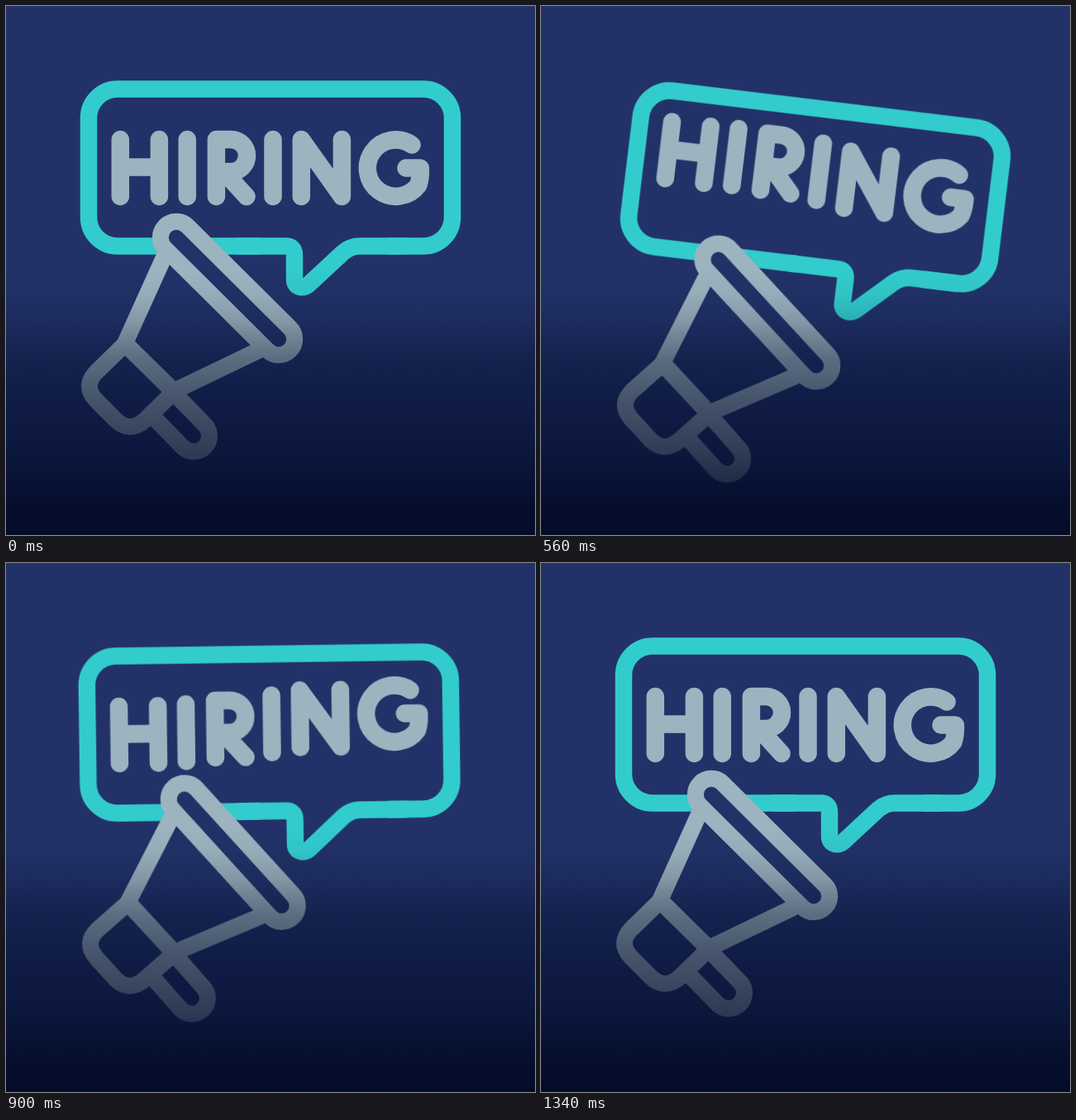
An HTML page for the animation above (1360 ms loop, 640 by 640 pixels).

```html
<!DOCTYPE html>
<html lang="en">
<head>
<meta charset="utf-8">
<title>Hiring</title>
<style>
  html, body { margin: 0; width: 100%; height: 100%; overflow: hidden; background: #223268; }
  svg { display: block; width: 100vw; height: 100vh; }

  .line { fill: none; stroke-width: 20.5; stroke-linejoin: round; }
  .bubble { stroke: #33cccc; }
  .grey { stroke: #9db3bf; stroke-linecap: round; }
  .letters { stroke-width: 21.5; }
  .horn { fill: #223268; stroke-width: 20; }
  stop { stop-color: #030d2c; }
  .deep { stop-color: #020a25; }

  .lift, .swing, .slide, .hop, .drop, .shake {
    animation: 1360ms cubic-bezier(.37, 0, .63, 1) infinite both;
  }
  .lift { animation-name: lift; }
  .swing { animation-name: swing; transform-origin: 320px 295px; }
  .slide { animation-name: slide; }
  .hop { animation-name: hop; animation-delay: calc(var(--i) * 60ms); }
  .drop { animation-name: drop; }
  .shake { animation-name: shake; transform-origin: 190px 478px; }

  @keyframes lift {
    0%, 17.8%, 78.68%, 100% { transform: translateY(0); }
    48.53% { transform: translateY(26.5px); }
  }
  @keyframes swing {
    0%, 25.74%, 91.18%, 100% { transform: rotate(0deg); }
    40.07% { transform: rotate(7.1deg); }
    56.03% { transform: rotate(-6.9deg); }
    76.1% { transform: rotate(5deg); }
  }
  /* the tail slips along the lower edge as the bubble tilts */
  @keyframes slide {
    0%, 25.74%, 91.18%, 100% { transform: translateX(0); }
    40.07% { transform: translateX(21px); }
    56.03% { transform: translateX(-18px); }
    76.1% { transform: translateX(18px); }
  }
  @keyframes hop {
    0%, 8.09%, 66.91%, 100% { transform: translateY(0); }
    36.76% { transform: translateY(-25px); }
  }
  @keyframes drop {
    0%, 8.82%, 76.47%, 100% { transform: translateY(0); }
    39.7% { transform: translateY(26px); }
  }
  @keyframes shake {
    0%, 8.82%, 84.45%, 100% { transform: rotate(0deg); }
    12.26%, 26.01%, 39.76%, 53.51%, 67.26%, 81.01% { transform: rotate(3.2deg); }
    19.14%, 32.89%, 46.64%, 60.39%, 74.14% { transform: rotate(-3.2deg); }
  }
</style>
</head>
<body>
<svg viewBox="0 0 640 640" role="img" aria-label="HIRING">
  <defs>
    <linearGradient id="shade" gradientUnits="userSpaceOnUse" x1="0" y1="320" x2="0" y2="640">
      <stop offset="0" stop-opacity="0"/>
      <stop offset=".09" stop-opacity=".04"/>
      <stop offset=".19" stop-opacity=".16"/>
      <stop offset=".25" stop-opacity=".28"/>
      <stop offset=".33" stop-opacity=".42"/>
      <stop offset=".47" stop-opacity=".56"/>
      <stop offset=".69" stop-opacity=".72"/>
      <stop class="deep" offset=".88" stop-opacity=".88"/>
      <stop class="deep" offset="1" stop-opacity=".95"/>
    </linearGradient>
  </defs>

  <rect width="640" height="640" fill="#223268"/>

  <g class="lift">
    <g class="swing">
      <g class="line bubble">
        <path d="M308 290.5H135A35 35 0 0 1 100 255.5V135.5A35 35 0 0 1 135 100.5H505A35 35 0 0 1 540 135.5V255.5A35 35 0 0 1 505 290.5H462"/>
        <path class="slide" d="M280 290.5H338Q349 290.5 349 301V331C349 340 358 343 366 337L408 298Q417 290.5 428 290.5H485"/>
      </g>
      <g class="line grey letters">
        <path class="hop" style="--i:0" d="M138.3 161.5V230.5M185.4 161.5V230.5M138.3 195H185.4"/>
        <path class="hop" style="--i:1" d="M219.3 161.5V230.5"/>
        <path class="hop" style="--i:2" d="M254.4 230.5V161.5H272A19.5 19.5 0 0 1 272 200.5H254.4M266 203L291 230.5"/>
        <path class="hop" style="--i:3" d="M323 161.5V230.5"/>
        <path class="hop" style="--i:4" d="M357.3 230.5V161.5L406.4 230.5V161.5"/>
        <path class="hop" style="--i:5" d="M491 168A34.2 34.2 0 1 0 499 216.5Q501.8 208 501.3 196H484"/>
      </g>
    </g>
  </g>

  <g class="drop">
    <g class="line grey horn shake">
      <path d="M181 500L214.6 534.4A19 19 0 0 0 241.4 507.6L205 470"/>
      <path d="M305 417L203 466L144 408L191 304"/>
      <path d="M144 409L109 443Q93 460 109 477L133 501Q150 517 168 501L203 467Z"/>
      <rect x="161.5" y="322.25" width="213" height="38.5" rx="19.25" transform="rotate(44.8 268 341.5)"/>
    </g>
  </g>

  <rect y="320" width="640" height="320" fill="url(#shade)"/>
</svg>
</body>
</html>
```
